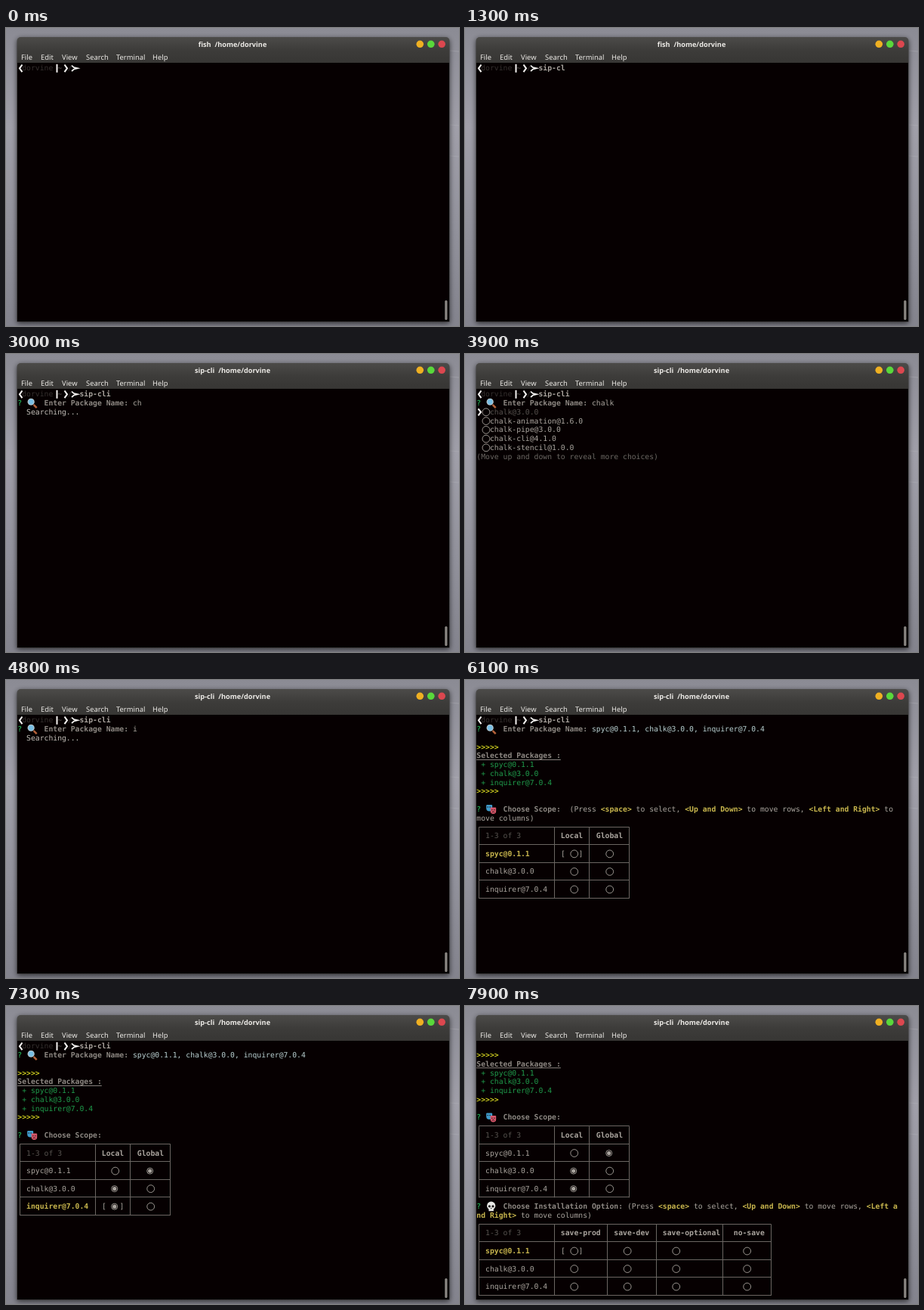
These frames come from a looping animation (600 by 394 pixels, 8 s). An HTML page with a canvas:

```html
<!DOCTYPE html>
<html lang="en">
<head>
<meta charset="utf-8">
<title>Terminal</title>
<style>
  html, body { margin: 0; height: 100%; overflow: hidden; background: #8f8f98; }
  canvas { display: block; width: 600px; height: 394px; }
</style>
</head>
<body>
<canvas id="stage" width="600" height="394"></canvas>
<script>
const ctx = document.getElementById('stage').getContext('2d');
const LOOP = 8000, COLUMNS = 95, CELL = 5.87, LINE = 11.77;
const USER = 'dorvine';
const MONO = '9.75px "DejaVu Sans Mono", monospace';
const SANS = '"Noto Sans", "Open Sans", sans-serif';

const WHITE = '#f4f2f0', TEXT = '#aaa59f', GRAY = '#8d8883', DIM = '#56524f', FAINT = '#35302f',
      GREEN = '#1f9c4c', YELLOW = '#c8b64e', BRIGHT = '#c9c81f', ANSWER = '#b9d0d2', RULE = '#6a6662';

const PACKAGES = ['spyc@0.1.1', 'chalk@3.0.0', 'inquirer@7.0.4'];
const RESULTS = {
  spyc: [PACKAGES[0], '@ecommerce-builder/spycameracctv-mini-cms-firestore-lib@0.1.0'],
  chalk: [PACKAGES[1], 'chalk-animation@1.6.0', 'chalk-pipe@3.0.0', 'chalk-cli@4.1.0', 'chalk-stencil@1.0.0'],
  inquirer: [PACKAGES[2], 'inquirer-autocomplete-prompt@1.0.1', 'inquirer-fuzzy-path@2.2.0',
    'inquirer-datepicker-prompt@0.4.2', 'inquirer-table-prompt@0.2.1'],
};

// Terminal grid: column edges and row centres
const px = col => 15.3 + col * CELL;
const py = row => 53.3 + row * LINE;

function stroke(color, width, ...points) {
  ctx.strokeStyle = color;
  ctx.lineWidth = width;
  ctx.beginPath();
  points.forEach(([x, y]) => ctx.lineTo(x, y));
  ctx.stroke();
}

function disc(x, y, r, color) {
  ctx.fillStyle = color;
  ctx.beginPath();
  ctx.arc(x, y, r, 0, 7);
  ctx.fill();
}

function ring(x, y, r, color) {
  ctx.strokeStyle = color;
  ctx.lineWidth = 0.9;
  ctx.beginPath();
  ctx.arc(x, y, r, 0, 7);
  ctx.stroke();
}

function gradient(y0, y1, ...colors) {
  const fill = ctx.createLinearGradient(0, y0, 0, y1);
  colors.forEach((c, i) => fill.addColorStop(i / (colors.length - 1), c));
  return fill;
}

function label(text, x, y, font, align = 'left') {
  ctx.font = font;
  ctx.textAlign = align;
  ctx.fillStyle = '#eceae6';
  ctx.fillText(text, x, y);
}

// Writes text on the grid, wraps at the last column, returns the next [row, col]
function put(row, col, text, color = TEXT, bold = false) {
  ctx.font = (bold ? 'bold ' : '') + MONO;
  ctx.textAlign = 'left';
  ctx.fillStyle = color;
  for (const char of text) {
    if (col === COLUMNS) { row++; col = 0; }
    ctx.fillText(char, px(col++), py(row) + 3);
  }
  return [row, col];
}

function radio(col, row, checked, color = TEXT) {
  const x = px(col), y = py(row);
  if (!checked) return ring(x, y, 4.9, color);
  ring(x - 1, y, 4, color);
  disc(x - 1, y, 2.6, color);
}

const icons = {
  magnifier(x, y) {
    stroke('#b5623a', 2.6, [x + 2, y + 2], [x + 6, y + 6]);
    disc(x - 1.5, y - 1.8, 4.6, '#b9c6cc');
    disc(x - 1.5, y - 1.8, 3.4, '#79bfe4');
  },
  masks(x, y) {
    ctx.fillStyle = '#3f9ccc';
    ctx.beginPath();
    ctx.roundRect(x - 6.5, y - 6, 8, 8.5, [1, 1, 4, 4]);
    ctx.fill();
    ctx.fillStyle = '#d8566a';
    ctx.beginPath();
    ctx.roundRect(x - 1, y - 2.5, 7.5, 8.5, [1, 1, 4, 4]);
    ctx.fill();
    [[-4.5, -3], [-1.6, -3], [1.2, 0.8], [4.2, 0.8]].forEach(([dx, dy]) => disc(x + dx, y + dy, 0.8, '#2a1a20'));
    stroke('#2a1a20', 1, [x + 1, y + 4], [x + 2.7, y + 3], [x + 4.4, y + 4]);
  },
  skull(x, y) {
    disc(x, y - 1, 5.6, '#e9e9e6');
    ctx.fillRect(x - 3.2, y + 2, 6.4, 4);
    disc(x - 2.3, y - 0.3, 1.6, '#1c1818');
    disc(x + 2.3, y - 0.3, 1.6, '#1c1818');
    disc(x, y + 2.4, 0.7, '#1c1818');
  },
};

function question(row, icon, text) {
  put(row, 0, '?', GREEN, true);
  icons[icon](px(3.3), py(row));
  return put(row, 6, text, GRAY, true);
}

function keyHint(row, col) {
  const parts = ['(Press ', '<space>', ' to select, ', '<Up and Down>', ' to move rows, ', '<Left and Right>', ' to move columns)'];
  parts.forEach((part, i) => {
    [row, col] = i % 2 ? put(row, col, part, YELLOW, true) : put(row, col, part);
  });
}

// columns: [title, title column, radio column]; edges: columns of the vertical rules;
// checks: chosen column of each package; cursor: [package, column] or null
function table(top, columns, edges, checks, cursor) {
  const right = px(edges[edges.length - 1] + 0.5), left = px(0.5);
  for (let i = 0; i <= 4; i++) {
    const y = Math.round(py(top + 2 * i)) - 0.5;
    stroke(RULE, 1, [left, y], [right, y]);
  }
  edges.forEach(col => {
    const x = Math.floor(px(col + 0.5)) + 0.5;
    stroke(RULE, 1, [x, py(top)], [x, py(top + 8)]);
  });
  put(top + 1, 2, '1-3 of 3', DIM);
  columns.forEach(([title, col]) => put(top + 1, col, title, TEXT, true));
  PACKAGES.forEach((name, i) => {
    const row = top + 3 + 2 * i, active = cursor && cursor[0] === i;
    put(row, 2, name, active ? YELLOW : TEXT, active);
    columns.forEach(([, , col], c) => {
      radio(col, row, checks[i] === c);
      if (active && cursor[1] === c) {
        put(row, col - 3, '[');
        put(row, col + 1, ']');
      }
    });
  });
}

function drawWindow(title) {
  ctx.fillStyle = gradient(0, 394, '#8b8b94', '#a09fa9', '#92929c', '#83838d');
  ctx.fillRect(0, 0, 600, 394);
  [30, 128, 169].forEach(y => stroke('#b4b4bc66', 1, [588, y], [600, y + 1]));

  ctx.save();
  ctx.shadowColor = '#000a';
  ctx.shadowBlur = 7;
  ctx.shadowOffsetY = 2;
  ctx.fillStyle = gradient(12, 46, '#4c4b49', '#3d3c3a', '#373634');
  ctx.beginPath();
  ctx.roundRect(14.5, 12, 573, 376.5, [5, 5, 0, 0]);
  ctx.fill();
  ctx.restore();
  ctx.fillStyle = '#060001';
  ctx.fillRect(15, 46, 572, 342);

  label(`${title}  /home/${USER}`, 300, 24.5, `bold 9.2px ${SANS}`, 'center');
  const menu = { File: 20, Edit: 46, View: 74, Search: 106, Terminal: 146, Help: 194 };
  for (const name in menu) label(name, menu[name], 41.5, `9.4px ${SANS}`);
  disc(548.3, 21.3, 4.8, '#efb022');
  disc(562.8, 21.3, 4.8, '#59d83b');
  disc(577.2, 21.3, 4.8, '#dc474f');
  ctx.fillStyle = '#8b8884';
  ctx.beginPath();
  ctx.roundRect(581.3, 360, 3.2, 26, 1.6);
  ctx.fill();
}

function shellPrompt(command) {
  const y = py(0);
  put(0, 1, USER, FAINT);
  put(0, 9, '~', DIM);
  put(0, 11.3, '/', FAINT);
  stroke(WHITE, 2.1, [21.5, y - 4.8], [18, y], [21.5, y + 4.8]);
  stroke(WHITE, 2, [67.5, y - 5.5], [67.5, y + 5.5]);
  stroke(WHITE, 2.1, [77.5, y - 4.8], [81, y], [77.5, y + 4.8]);
  stroke(WHITE, 1.7, [87, y - 3.7], [90, y - 1.2], [95, y], [90, y + 1.2], [87, y + 3.7]);
  put(0, 14, command, TEXT, true);
}

const typing = (word, t, start, step = 100) =>
  word.slice(0, Math.max(0, Math.floor((t - start) / step) + 1));
const erasing = (word, t, start, step = 100) =>
  word.slice(0, Math.max(0, word.length - 1 - Math.floor((t - start) / step)));

function queryAt(t) {
  if (t < 2700) return typing('spyc', t, 1700);
  if (t < 2900) return erasing('spyc', t, 2700, 50);
  if (t < 4300) return typing('chalk', t, 2900);
  if (t < 4800) return erasing('chalk', t, 4300);
  return typing('inquirer', t, 4800, 85);
}

// [word, list shown, item checked, list hidden]
const SEARCHES = [['spyc', 2300, 2500, 2700], ['chalk', 3900, 4100, 4300], ['inquirer', 5600, 5800, 6000]];

function searchView(t) {
  question(1, 'magnifier', 'Enter Package Name:');
  put(1, 26, queryAt(t));
  const found = SEARCHES.find(([, shown, , hidden]) => t >= shown && t < hidden);
  if (!found) {
    if (t >= 1600) put(2, 2, 'Searching...', '#c4bfba');
    return;
  }
  const [word, , checkedAt] = found, list = RESULTS[word], y = py(2);
  stroke(WHITE, 2.1, [17.5, y - 4.5], [21, y], [17.5, y + 4.5]);
  list.forEach((name, i) => {
    const checked = i === 0 && t >= checkedAt;
    radio(2.15, 2 + i, checked, checked ? GREEN : TEXT);
    put(2 + i, 3, name, i ? TEXT : DIM);
  });
  if (list.length === 5) put(7, 0, '(Move up and down to reveal more choices)', '#6b6763');
}

const SCOPES = [['Local', 19, 22.05], ['Global', 27, 30.05]];
const OPTIONS = [['save-prod', 19, 22.05], ['save-dev', 31, 34.05], ['save-optional', 42, 45.05], ['no-save', 58, 61.05]];

function scopeView(t) {
  const done = t >= 7500, shift = done ? -2 : 0;
  if (!done) {
    question(1, 'magnifier', 'Enter Package Name:');
    put(1, 26, PACKAGES.join(', '), ANSWER);
  }
  put(3 + shift, 0, '>>>>>', BRIGHT, true);
  const heading = 'Selected Packages :', y = py(4 + shift) + 5;
  put(4 + shift, 0, heading, GRAY, true);
  stroke(GRAY, 1, [px(0), y], [px(heading.length), y]);
  PACKAGES.forEach((name, i) => put(5 + i + shift, 1, '+ ' + name, GREEN));
  put(8 + shift, 0, '>>>>>', BRIGHT, true);

  const [row, col] = question(10 + shift, 'masks', 'Choose Scope:');
  const hint = t < 6600;
  if (hint) keyHint(row, col + 2);
  const checks = [t >= 6600 ? 1 : -1, t >= 7000 ? 0 : -1, t >= 7300 ? 0 : -1];
  const line = t < 6800 ? 0 : t < 7200 ? 1 : 2;
  const side = t >= 6300 && t < 6900 ? 1 : 0;
  table((hint ? 12 : 11) + shift, SCOPES, [0, 17, 25, 34], checks, done ? null : [line, side]);

  if (done) {
    const [r, c] = question(18, 'skull', 'Choose Installation Option:');
    keyHint(r, c + 1);
    table(20, OPTIONS, [0, 17, 29, 40, 55, 66], [-1, -1, -1], [0, 0]);
  }
}

function draw(now) {
  const t = now % LOOP;
  ctx.textRendering = 'geometricPrecision';
  drawWindow(t < 1500 ? 'fish' : 'sip-cli');
  if (t < 7500) shellPrompt(typing('sip-cli', t, 800));
  if (t >= 6000) scopeView(t);
  else if (t >= 1500) searchView(t);
  requestAnimationFrame(draw);
}
requestAnimationFrame(draw);
</script>
</body>
</html>
```
